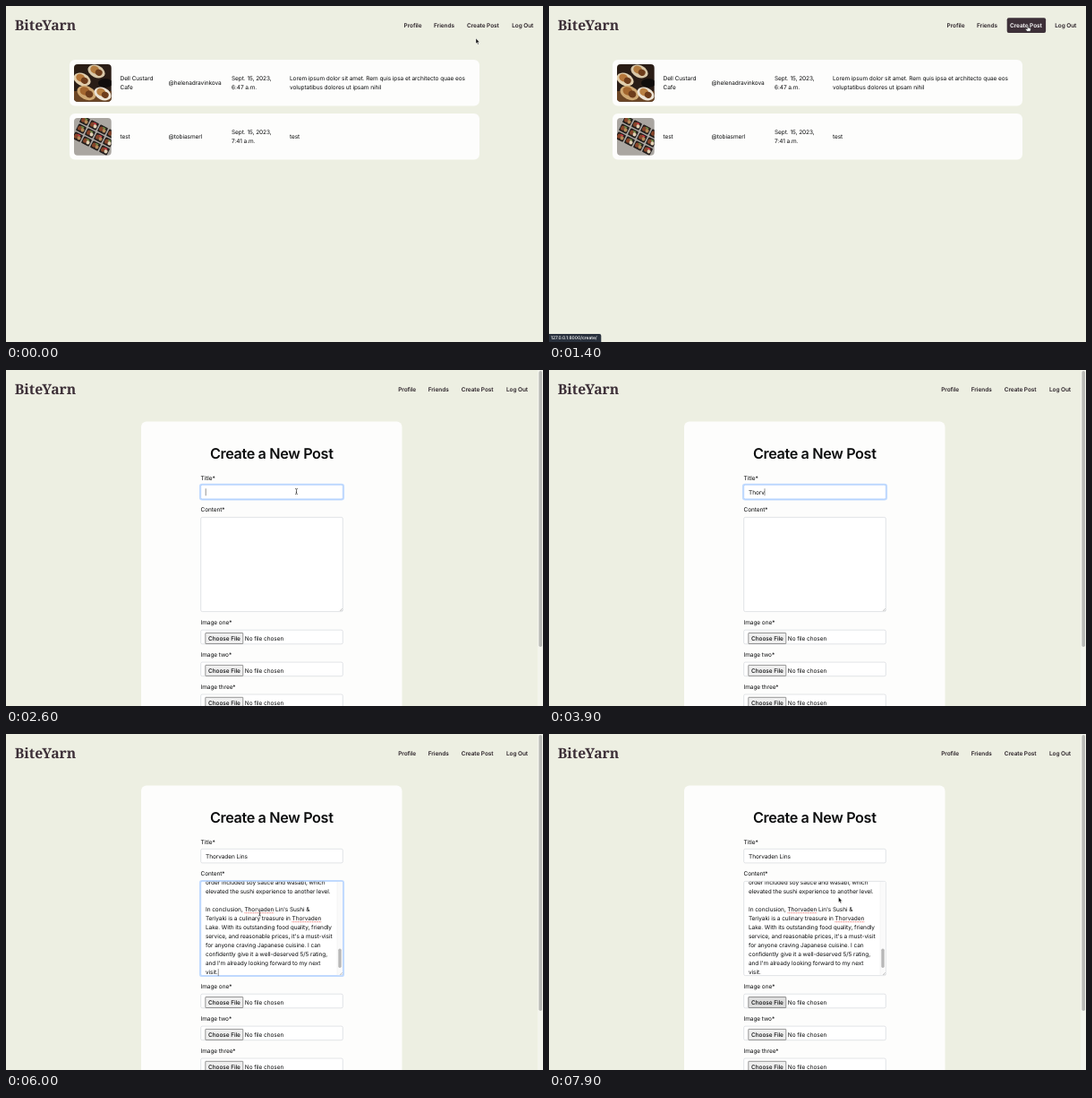
An HTML page for the animation above (8000 ms loop, 600x375 px).

```html
<!DOCTYPE html>
<html lang="en">
<head>
<meta charset="utf-8">
<title>Create a New Post</title>
<style>
  html, body { margin: 0; width: 100%; height: 100%; overflow: hidden; background: #edefe2; }
  svg { display: block; width: 600px; height: 375px; }
  text {
    font: 6.5px Inter, sans-serif; letter-spacing: -.01em; fill: #0c0d0e;
    white-space: pre; text-rendering: geometricPrecision;
  }
  .nav { font-weight: 600; fill: #2b2228; }
  .logo { font: 800 15.7px "Noto Serif", serif; letter-spacing: 0; fill: #3d3038; }
  .heading { font-size: 16.2px; font-weight: 600; letter-spacing: -.022em; text-anchor: middle; }
  .button { font-weight: 500; }
  .status { font-size: 5px; font-weight: 500; fill: #fff; }
</style>
</head>
<body>
<svg id="stage" viewBox="0 0 600 375"></svg>
<script>
const LOOP = 8000, STEP = 100;
const PLACE = 'Thorvaden', TITLE = PLACE + ' Lins';
const REVIEW = [
  'order included soy sauce and wasabi, which',
  'elevated the sushi experience to another level.',
  '',
  `In conclusion, ${PLACE} Lin's Sushi &`,
  `Teriyaki is a culinary treasure in ${PLACE}`,
  'Lake. With its outstanding food quality, friendly',
  "service, and reasonable prices, it's a must-visit",
  'for anyone craving Japanese cuisine. I can',
  'confidently give it a well-deserved 5/5 rating,',
  "and I'm already looking forward to my next",
  'visit.'
];
// time, x, y of the pointer
const PATH = [
  [300, 525, 36], [400, 538, 33], [600, 538, 33], [900, 535, 22], [1500, 535, 22],
  [2400, 324.5, 135.5], [5400, 324.5, 135.5], [5700, 283.5, 200], [6200, 283.5, 200],
  [6800, 248, 299], [7200, 248, 299], [7800, 323.5, 182]
];

const stage = document.getElementById('stage');
const ruler = document.createElement('canvas').getContext('2d');
ruler.font = '65px Inter, sans-serif';
const widthOf = s => ruler.measureText(s).width / 10 - s.length * .065;

const text = (x, y, s, cls = '') =>
  `<text x="${x}" y="${y}" class="${cls}">${s.replace(/&/g, '&amp;')}</text>`;
const rect = (x, y, w, h, fill, r = 0, more = '') =>
  `<rect x="${x}" y="${y}" width="${w}" height="${h}" rx="${r}" fill="${fill}" ${more}/>`;
const ellipse = (x, y, rx, ry, fill) =>
  `<ellipse cx="${x}" cy="${y}" rx="${rx}" ry="${ry}" fill="${fill}"/>`;
const line = (d, colour, w = .5, more = '') =>
  `<path d="${d}" fill="none" stroke="${colour}" stroke-width="${w}" ${more}/>`;
const caret = (x, y) => line(`M${x} ${y - 6.2}v8`, '#222', .5);

function misspelt(x, y, s) {
  const start = x + widthOf(s.slice(0, s.indexOf(PLACE)));
  return line(`M${start} ${y + 1.4}h${widthOf(PLACE)}`, '#e0473f', .7, 'stroke-dasharray="1 .6"');
}

function field(y, h, focused) {
  const ring = focused ? rect(216.7, y - .7, 160.6, h + 1.4, 'none', 2.4, 'stroke="#c2dbfe" stroke-width="1.6"') : '';
  return ring + rect(217.7, y, 158.6, h, '#fff', 1.6, `stroke="${focused ? '#86b7fe' : '#c4c9ce'}" stroke-width=".5"`);
}

function fileField(label, y, pressed) {
  return text(217.5, y - 5.8, label) + field(y, 15.6) +
    rect(222.8, y + 3.3, 42, 12, pressed ? '#dedede' : '#efefef', .5, 'stroke="#555" stroke-width=".6"') +
    text(226, y + 11.7, 'Choose File', 'button') + text(266.8, y + 11.7, 'No file chosen');
}

function photo(id, y, content) {
  return `<clipPath id="${id}">${rect(0, 0, 41.7, 41.7, '#000', 4)}</clipPath>
    <g transform="translate(76 ${y})"><g clip-path="url(#${id})">${content}</g></g>`;
}

function dish(x, y, size, plate, food) {
  return `<g transform="translate(${x} ${y}) rotate(25)">` + ellipse(0, 0, size, size * .68, plate) +
    ellipse(-size * .25, -1, size * .5, size * .42, food) + ellipse(size * .3, 0, size * .4, size * .36, '#6e3d1c') + '</g>';
}

const desserts = rect(0, 0, 42, 42, '#2a1d16') + rect(0, 30, 42, 12, '#6b4525') +
  dish(25, 8, 10, '#d8c7a8', '#b27a3e') + dish(9, 17, 10, '#e2cfae', '#b5763a') +
  ellipse(35, 21, 8, 5, '#100d0c') +
  dish(14, 32, 11, '#cfa873', '#a3662f') + dish(32, 33, 10, '#ece4d6', '#b98144');

function trays() {
  let out = rect(0, 0, 42, 42, '#aaa6a1');
  for (let i = 0; i < 12; i++) {
    const column = i % 4, row = Math.floor(i / 4);
    const x = 4 + column * 10 + row * 4, y = 21 + column * 5 - row * 9;
    out += `<g transform="translate(${x} ${y}) rotate(27)">` + rect(-4.8, -4.2, 9.6, 8.4, '#221d1b', 1) +
      ellipse(-1.8, 0, 2.2, 2.6, '#87452a') + ellipse(2, .5, 2, 2.2, i % 2 ? '#e0d0b4' : '#b58a5a') +
      rect(-1, -3, 3.5, 1.5, i % 3 ? '#6f8a45' : '#cc3a45') + '</g>';
  }
  return out;
}

function header(shift, hover) {
  const links = [['Profile', 444.5], ['Friends', 478], ['Create Post', 515], ['Log Out', 565.2]];
  return text(9.8, 26.6, 'BiteYarn', 'logo') +
    (hover ? rect(511.7, 13.3, 43.4, 16.7, '#3d3038', 2) : '') +
    links.map(([name, x], i) => text(x - shift, 24.2, name, 'nav')
      .replace('<text', hover && i === 2 ? '<text style="fill:#fff"' : '<text')).join('');
}

function feed(t) {
  const row = (y, photoPart, user, time, place, body) => rect(71, y, 458, 51.6, '#fdfdfc', 6) + photoPart +
    [[127.5, place], [181.5, [user]], [252, ['Sept. 15, 2023,', time]], [317, body]]
      .map(([x, lines]) => lines.map((s, i) =>
        text(x, y + 28.3 + (i - (lines.length - 1) / 2) * 10, s)).join('')).join('');
  return header(0, t >= 800) +
    row(60, photo('first', 65, desserts), '@helenadravinkova', '6:47 a.m.', ['Dell Custard', 'Cafe'],
      ['Lorem ipsum dolor sit amet. Rem quis ipsa et architecto quae eos', 'voluptatibus dolores ut ipsam nihil']) +
    row(120, photo('second', 125, trays()), '@tobiasmerl', '7:41 a.m.', ['test'], ['test']);
}

function typedCount(t) {
  if (t < 3100) return 0;
  if (t < 3500) return 1;
  if (t < 4900) return Math.min(12, 2 + Math.floor((t - 3500) / 110));
  return t < 5000 ? 13 : 14;
}

function titleField(t) {
  const focused = t >= 2500 && t < 5700, typed = TITLE.slice(0, typedCount(t));
  const blinkOn = t >= 2600 && !(t >= 2900 && t < 3100);
  return field(128.3, 15.6, focused) + text(223, 138.5, typed) +
    (focused && typed.length > 9 ? misspelt(223, 138.5, typed) : '') +
    (focused && blinkOn ? caret(223.2 + widthOf(typed), 138.5) : '');
}

function contentField(t) {
  const focused = t >= 5700 && t < 6900, pasted = t >= 5900;
  const blinkOn = focused && (t - 5700) % 1000 < 500;
  let out = field(164.4, 105.2, focused);
  if (pasted) {
    out += `<clipPath id="area">${rect(218, 164.8, 158, 104.5, '#000')}</clipPath><g clip-path="url(#area)">` +
      REVIEW.map((s, i) => {
        const y = 168.3 + i * 10;
        return text(223, y, s) + (s.includes(PLACE) ? misspelt(223, y, s) : '');
      }).join('') +
      rect(370, 164.8, 6, 104.5, '#fafafa') + line('M370 164.8v104.5', '#e8e8e8', .4) +
      rect(371.3, 239.5, 3.4, 21.5, '#b8b8b8', 1.7) + '</g>';
  }
  if (blinkOn) out += pasted ? caret(223.4 + widthOf('visit.'), 268.3) : caret(223.2, 174.5);
  return out + line('M373 269l2.8-2.8M374.6 269l1.2-1.2', '#777', .4);
}

function form(t) {
  return header(6.3, false) + rect(593.8, 0, 6.2, 375, '#f3f4ec') + rect(595.4, 1, 3.6, 308, '#b9bab6', 1.8) +
    rect(151, 57.5, 291.5, 330, '#fdfdfc', 6) +
    text(296.7, 98.7, 'Create a New Post', 'heading') +
    text(217.5, 122.5, 'Title*') + titleField(t) +
    text(217.5, 158.4, 'Content*') + contentField(t) +
    fileField('Image one*', 290.2, t >= 6900) + fileField('Image two*', 326.1) + fileField('Image three*', 362);
}

function pointer(t) {
  let next = PATH.findIndex(p => p[0] > t);
  if (next < 0) next = PATH.length;
  const a = PATH[Math.max(0, next - 1)], b = PATH[Math.min(next, PATH.length - 1)];
  const k = b[0] > a[0] ? Math.max(0, (t - a[0]) / (b[0] - a[0])) : 0, e = k * k * (3 - 2 * k);
  return [a[1] + (b[1] - a[1]) * e, a[2] + (b[2] - a[2]) * e];
}

function cursor(t) {
  if (t >= 3100 && t < 5400) return '';
  const [x, y] = pointer(t);
  const overText = t > 1700 && t < 6900 && x < 376 && (y > 128 && y < 144 || y > 164 && y < 270);
  let shape;
  if (t >= 800 && t < 1700) {
    shape = '<path d="M-.7 .2Q0-.7 .7 .2V2.3L2.9 2.8Q3.5 3 3.4 3.7L2.8 6.3H-.9L-2.6 3.9Q-2.6 3-1.7 3.3L-.7 4Z" fill="#fff" stroke="#111" stroke-width=".5"/>';
  } else if (overText) {
    const beam = 'M-1.4-3Q0-3 0-2.3Q0-3 1.4-3M0-2.3V2.3M-1.4 3Q0 3 0 2.3Q0 3 1.4 3M-.7 .9H.7';
    shape = line(beam, '#fff', 1.2) + line(beam, '#111', .6);
  } else {
    shape = '<path d="M0 0V6L1.3 4.8 2.2 6.9 3.2 6.4 2.3 4.4H4.1Z" fill="#111" stroke="#fff" stroke-width=".45"/>';
  }
  return `<g transform="translate(${x} ${y})">${shape}</g>`;
}

function statusBar(t) {
  if (t < 800 || t >= 1900) return '';
  return rect(-3, 366, 61.3, 12, '#29313d', 2) + text(2, 372.4, '127.0.0.1:8000/create/', 'status');
}

let shown = -1;
function frame(now) {
  const t = Math.floor(now % LOOP / STEP) * STEP;
  if (t !== shown) {
    shown = t;
    stage.innerHTML = rect(0, 0, 600, 375, '#edefe2') + (t < 1500 ? feed(t) : form(t)) + statusBar(t) + cursor(t);
  }
  requestAnimationFrame(frame);
}
frame(performance.now());
</script>
</body>
</html>
```
